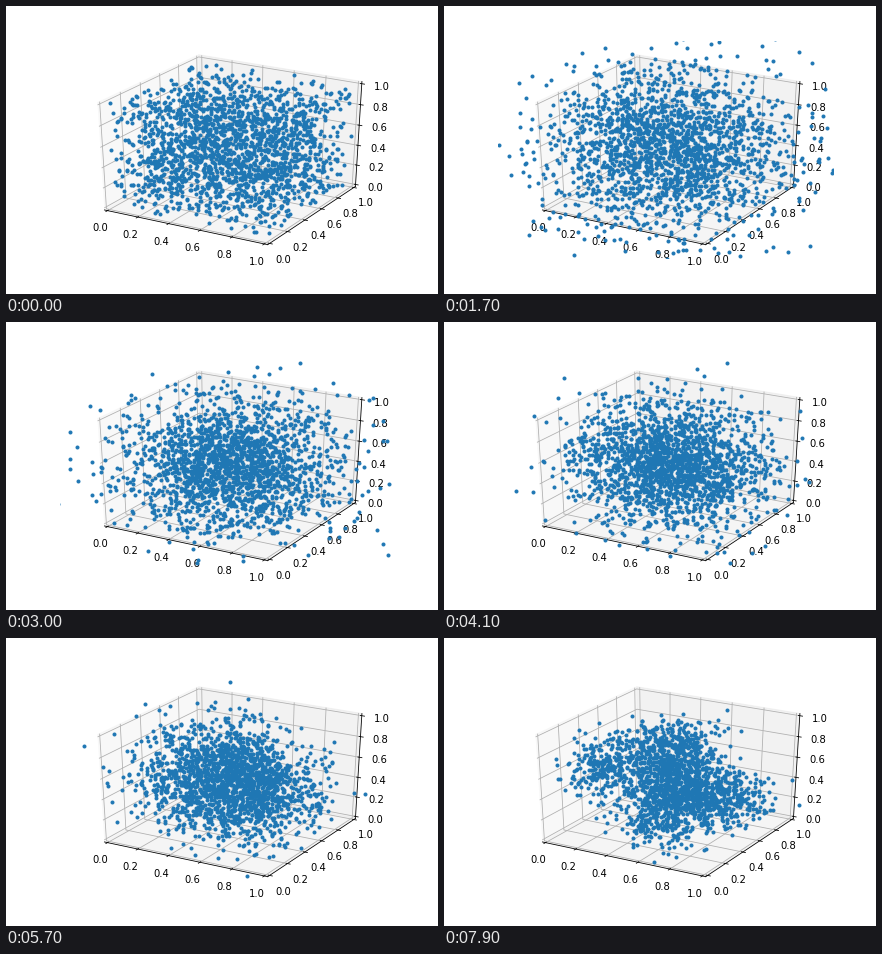
These frames come from a looping animation (432 px wide and 288 px high, 8 s). A matplotlib script:

```python
import numpy as np
import matplotlib.pyplot as plt
from matplotlib.animation import FuncAnimation

COUNT, FRAMES, STEP = 2000, 80, 100
MARGIN = 1 / 48
MIDDLE = np.array((0.51, 0.50, 0.49))
# Cluster offsets from the middle, with the share of dots in each.
OFFSETS = np.array([
    (0.03, 0.00, 0.00),
    (-0.42, 0.00, 0.01),
    (0.31, -0.04, -0.07),
    (-0.01, 0.00, 0.33),
    (-0.05, 0.00, -0.37),
])
SHARES = (0.32, 0.17, 0.18, 0.16, 0.17)

rng = np.random.default_rng(7)
start = rng.random((COUNT, 3))
arm = OFFSETS[rng.choice(len(OFFSETS), size=COUNT, p=SHARES)]


def jitter(keep=0.5):
    """Correlated unit noise: each step keeps part of the last one."""
    noise = rng.standard_normal((FRAMES, COUNT, 3))
    for k in range(1, FRAMES):
        noise[k] = keep * noise[k - 1] + np.sqrt(1 - keep**2) * noise[k]
    return noise


noise = jitter()


def positions(k):
    """A uniform cube heats into one wide cloud, then cools into clusters."""
    t = k * STEP / 1000
    heat = 1 - np.exp(-t / 0.3)
    spread = min(0.36, 0.44 * np.exp(-0.155 * t))
    cloud = MIDDLE + (t / 8) ** 0.8 * arm + spread * noise[k]
    return start + heat * (cloud - start)


fig = plt.figure(figsize=(6, 4), dpi=72, facecolor="white")
fig.subplots_adjust(left=0.125, right=0.9, bottom=0.125, top=0.88)
ax = fig.add_subplot(projection="3d")
# Let the projection fill the whole subplot rectangle instead of a square.
ax.apply_aspect = lambda position=None: None
ax.set_box_aspect((1, 1, 1), zoom=np.sqrt(3) / 1.8294640721620434)
ax.view_init(elev=30, azim=-60)

dots, = ax.plot(*start.T, ".", color="#1f77b4", markersize=6)

limits, ticks = (-MARGIN, 1 + MARGIN), np.linspace(0, 1, 6)
ax.set(xlim=limits, ylim=limits, zlim=limits,
       xticks=ticks, yticks=ticks, zticks=ticks)


def update(k):
    dots.set_data_3d(*positions(k).T)
    return dots,


anim = FuncAnimation(fig, update, frames=FRAMES, interval=STEP, repeat=True)
plt.show()
```
